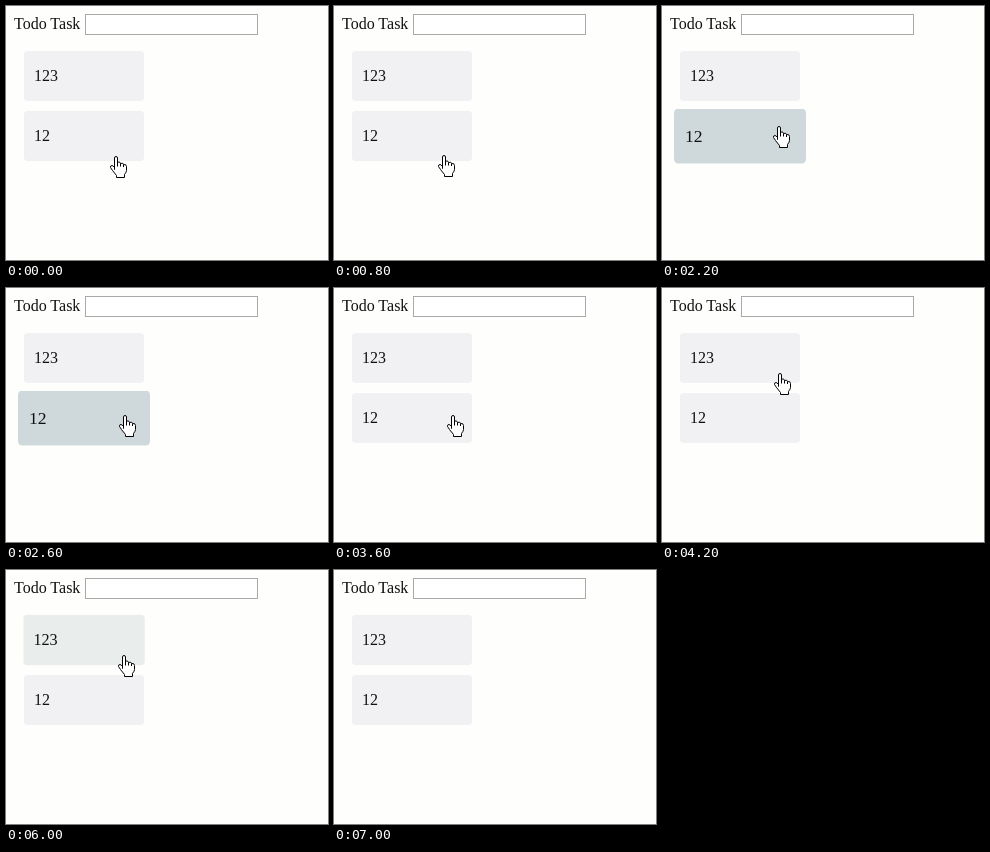
An HTML page for the animation above (8 s loop, 322 by 254 pixels).

```html
<!DOCTYPE html>
<html lang="en">
<head>
<meta charset="utf-8">
<title>Todo Task</title>
<style>
  html, body { margin: 0; width: 100%; height: 100%; overflow: hidden; background: #fefefc; }
  svg { display: block; width: 322px; height: 254px; }
  text { font: 16px "Liberation Serif", "Times New Roman", serif; fill: #111; }
  .card { transform-box: view-box; fill: #f1f0f3; }
  #first { transform-origin: 78px 70px; }
  #second { transform-origin: 78px 130px; }
  #cursor path { fill: #fff; stroke: #000; stroke-linejoin: round; }
  #cursor .fingers { fill: none; }
</style>
</head>
<body>
<svg viewBox="0 0 322 254">
  <text x="8" y="23">Todo Task</text>
  <rect x="79.5" y="8.5" width="172" height="20" fill="#fff" stroke="#a9a9a9"/>
  <g id="first" class="card">
    <rect x="18" y="45" width="120" height="50" rx="4"/>
    <text x="28" y="75">123</text>
  </g>
  <g id="second" class="card">
    <rect x="18" y="105" width="120" height="50" rx="4"/>
    <text x="28" y="135">12</text>
  </g>
  <g id="cursor">
    <path d="M4.5 13.5V2Q4.5 .5 6 .5T7.5 2V6Q10.5 5.5 10.5 7.5Q13.5 6.5 13.5 8.5Q16.5 8 16.5 10.5V14.5Q16.5 16 14.5 18.5V21.5H6.5V19.5L2.5 14.5L.5 11.5Q.2 9.5 2 9.5Q3 9.5 4.5 11.5Z"/>
    <path class="fingers" d="M7.5 6V10.5M10.5 7.5V10.5M13.5 8.5V11"/>
  </g>
</svg>
<script>
  const LOOP = 8000;
  const REST = { transform: 'scale(1)', fill: '#f1f0f3' };
  const HOVER = { transform: 'scale(1.1)', fill: '#cfd9dc' };
  const FADING = { transform: 'scale(1.012)', fill: '#e9edec' };
  const at = (x, y, opacity = 1) => ({ transform: `translate(${x}px, ${y}px)`, opacity });

  // Each step is [start in ms, style], held until the next one.
  function play(id, steps) {
    const last = steps[steps.length - 1][1];
    const frames = [...steps, [LOOP, last]].map(([time, style]) =>
      ({ ...style, offset: time / LOOP, easing: 'step-end' }));
    const animation = document.getElementById(id).animate(frames, { duration: LOOP, iterations: Infinity });
    animation.startTime = 0;
    return animation;
  }

  const animations = [
    play('first', [[0, REST], [4600, HOVER], [6000, FADING], [6200, REST]]),
    play('second', [[0, REST], [1000, HOVER], [3600, REST]]),
    play('cursor', [
      [0, at(104, 150)], [200, at(104, 149)],
      [2200, at(111, 120)], [2400, at(112, 127)], [2600, at(113, 127)],
      [3800, at(112, 120)], [4000, at(112, 91)], [4200, at(112, 85)],
      [6800, at(113, 88)], [7000, at(113, 88, 0)]
    ])
  ];
  const start = document.timeline.currentTime ?? 0;
  animations.forEach(animation => { animation.startTime = start; });
</script>
</body>
</html>
```
